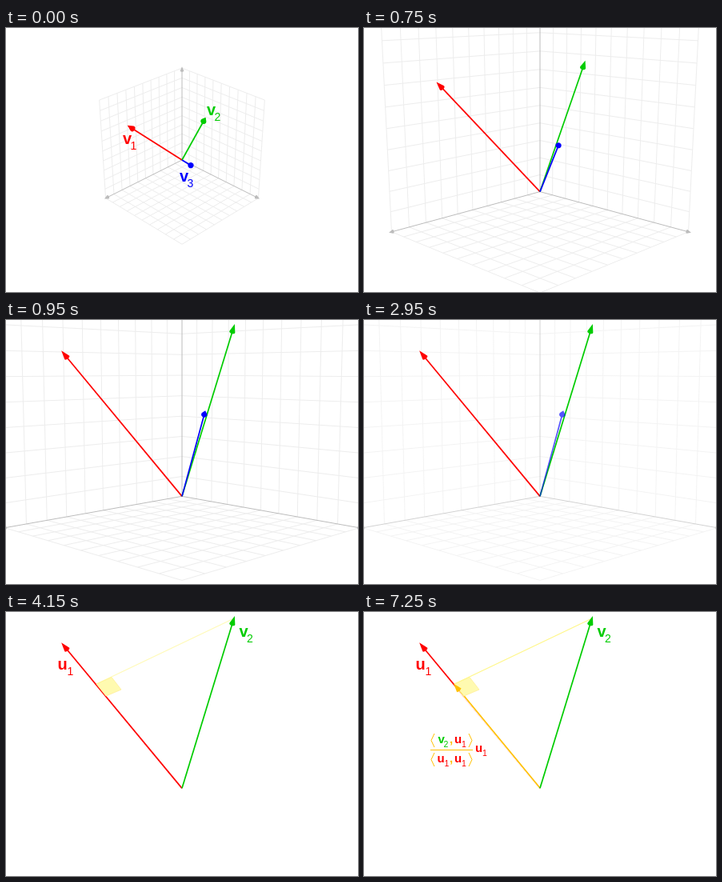
Write an HTML page that moves like this. It is 440 px wide and 330 px high and loops after 8 s.

```html
<!DOCTYPE html>
<html lang="en">
<head>
<meta charset="utf-8">
<title>Orthogonal projection of vectors</title>
<style>
  html, body { margin: 0; width: 100%; height: 100%; overflow: hidden; background: #fff; }
  svg { display: block; width: 100%; height: 100%; }
  text { font-family: "Liberation Sans", Arial, sans-serif; }
  .b { font-weight: bold; }
</style>
</head>
<body>
<svg id="stage" viewBox="0 0 440 330"></svg>
<script>
const RED = '#f00', GREEN = '#0c0', BLUE = '#00f', ORANGE = '#ffc000';
const LOOP = 8000, STEP = 50;
const FOCAL = 880, GRID = 0.985, CELLS = 10;

// World points are [right, toward viewer, up]; the floor axes lie at 45 degrees.
const world = (x, y, z) => [(y - x) * Math.SQRT1_2, (x + y) * Math.SQRT1_2, z];
const vectors = {
  red:   { tip: [-0.478, 0.594, 0.692], color: RED },
  green: { tip: [0.2046, 0.638, 0.7935], color: GREEN },
  blue:  { tip: [0.0825, 0.92, 0.473], color: BLUE }
};

const stage = document.getElementById('stage');
function add(parent, name, attrs = {}, text = '') {
  const node = document.createElementNS('http://www.w3.org/2000/svg', name);
  for (const key in attrs) node.setAttribute(key, attrs[key]);
  node.textContent = text;
  parent.appendChild(node);
  return node;
}
const group = () => add(stage, 'g');
const pathOf = pts => 'M' + pts.map(p => p[0].toFixed(2) + ' ' + p[1].toFixed(2)).join('L');

function addArrow(parent, color, width) {
  return {
    shaft: add(parent, 'path', { stroke: color, 'stroke-width': width, fill: 'none' }),
    head: add(parent, 'path', { fill: color })
  };
}
const addVector = (key, parent) => Object.assign(vectors[key], addArrow(parent, vectors[key].color, 1.7));

function addLabel(parent, x, y, letter, index, color, size = 20) {
  add(parent, 'text', { x, y, fill: color, 'font-size': size, class: 'b' }, letter);
  const advance = letter === 'u' ? 0.6 : 0.47;
  add(parent, 'text', {
    x: x + size * advance, y: y + size * 0.33, fill: color, 'font-size': size * 0.7
  }, index);
}

const scene = group();
const gridPath = add(scene, 'path', { stroke: '#ededed', fill: 'none' });
const axes = [world(1, 0, 0), world(0, 1, 0), world(0, 0, 1)]
  .map(tip => ({ tip, ...addArrow(scene, '#bcbcbc', 1) }));

addVector('red', stage);

// The white underlay lets the projected shaft replace the red one.
const projectedShaft = group();
for (const [stroke, width] of [['#fff', 3], [ORANGE, 1.7]]) {
  add(projectedShaft, 'path', { d: 'M220 220L118.5 97', stroke, 'stroke-width': width });
}

const right = group();
add(right, 'path', { d: 'M113 90L132 81.5L144 97L125 105Z', fill: '#fffab0', stroke: '#ffee99', 'stroke-width': 0.8 });
const dropLine = add(right, 'path', { d: 'M285 8L113 90', stroke: '#fff78a', 'stroke-width': 1.2 });

addVector('green', stage);
const blueGroup = group();
addVector('blue', blueGroup);

const firstLabels = group();
addLabel(firstLabels, 146, 145, 'v', '1', RED);
addLabel(firstLabels, 251, 109, 'v', '2', GREEN);
addLabel(firstLabels, 217, 192, 'v', '3', BLUE);

const secondLabels = group();
addLabel(secondLabels, 64.5, 72, 'u', '1', RED);
addLabel(secondLabels, 291.5, 31, 'v', '2', GREEN);

const projection = group();
add(projection, 'path', { d: 'M112 89.5L121.6 95.6L119.5 98.7L116.2 100.2Z', fill: ORANGE });
add(projection, 'path', { d: 'M83 172.5H136', stroke: ORANGE });
for (const y of [152, 176]) {
  add(projection, 'path', {
    d: `M88 ${y}L84 ${y + 8.5}L88 ${y + 17}M131 ${y}L135 ${y + 8.5}L131 ${y + 17}`,
    stroke: ORANGE, fill: 'none'
  });
  add(projection, 'text', { x: 107, y: y + 12, fill: ORANGE, 'font-size': 15, class: 'b' }, ',');
}
addLabel(projection, 92.5, 164, 'v', '2', GREEN, 15);
addLabel(projection, 113, 164, 'u', '1', RED, 15);
addLabel(projection, 91.5, 188, 'u', '1', RED, 15);
addLabel(projection, 113, 188, 'u', '1', RED, 15);
addLabel(projection, 139, 175, 'u', '1', RED, 15);

const mix = (a, b, p) => a + (b - a) * p;

// The camera glides on a straight line while its aim rises slightly.
function makeCamera(p) {
  const distance = mix(6.085, 3.41, p);
  const aim = mix(0, 0.219, p);
  const rise = mix(3.513, 0.615, p) - aim;
  const range = Math.hypot(distance, rise);
  const sin = rise / range, cos = distance / range;
  const depth = ([, d, z]) => range - d * cos - (z - aim) * sin;
  const project = v => {
    const k = FOCAL / depth(v);
    return [220 + v[0] * k, 165 - ((v[2] - aim) * cos - v[1] * sin) * k];
  };
  return { depth, project };
}

function convexHull(points) {
  const sorted = [...points].sort((a, b) => a[0] - b[0] || a[1] - b[1]);
  const half = list => {
    const out = [];
    for (const p of list) {
      while (out.length > 1) {
        const [a, b] = out.slice(-2);
        if ((b[0] - a[0]) * (p[1] - a[1]) - (b[1] - a[1]) * (p[0] - a[0]) > 0) break;
        out.pop();
      }
      out.push(p);
    }
    return out.slice(0, -1);
  };
  return [...half(sorted), ...half(sorted.reverse())];
}

const cross = (a, b) => [a[1] * b[2] - a[2] * b[1], a[2] * b[0] - a[0] * b[2], a[0] * b[1] - a[1] * b[0]];
const unit = v => v.map(c => c / Math.hypot(...v));

// Heads are cones whose size stays constant in pixels.
function drawArrow({ tip, shaft, head }, camera, length, radius) {
  const px = camera.depth(tip) / FOCAL;
  const dir = unit(tip);
  const a = unit(cross(dir, [1, 0, 0])), b = cross(dir, a);
  const base = tip.map((c, i) => c - dir[i] * length * px);
  const rim = Array.from({ length: 20 }, (_, n) => {
    const t = n * Math.PI / 10;
    return base.map((c, i) => c + radius * px * (a[i] * Math.cos(t) + b[i] * Math.sin(t)));
  });
  shaft.setAttribute('d', pathOf([[0, 0, 0], base].map(camera.project)));
  head.setAttribute('d', pathOf(convexHull([tip, ...rim].map(camera.project))) + 'Z');
}

function drawGrid({ project }) {
  const planes = [(a, b) => world(a, b, 0), (a, b) => world(a, 0, b), (a, b) => world(0, a, b)];
  let d = '';
  for (const plane of planes) {
    for (let i = 1; i <= CELLS; i++) {
      const c = GRID * i / CELLS;
      d += pathOf([plane(c, 0), plane(c, GRID)].map(project));
      d += pathOf([plane(0, c), plane(GRID, c)].map(project));
    }
  }
  gridPath.setAttribute('d', d);
}

const progress = (t, start, steps) =>
  Math.min(steps, Math.max(0, Math.floor((t - start) / STEP) + 1)) / steps;
const fade = (node, opacity) => node.setAttribute('opacity', opacity);

function render(t) {
  const u = progress(t, 500, 10);
  const camera = makeCamera(1 - (1 - u) ** 2);
  drawGrid(camera);
  for (const axis of axes) drawArrow(axis, camera, 6, 2.4);
  for (const key in vectors) drawArrow(vectors[key], camera, 12.5, 3.7);

  const flat = progress(t, 2950, 3);
  const dropped = progress(t, 4050, 3);
  const projected = progress(t, 7150, 3);
  fade(firstLabels, 1 - progress(t, 500, 3));
  fade(scene, 1 - flat);
  fade(blueGroup, 1 - flat);
  fade(right, dropped);
  fade(secondLabels, dropped);
  fade(dropLine, mix(0.6, 1, projected));
  fade(projectedShaft, projected);
  fade(projection, projected);
}

const start = performance.now();
function tick() {
  render((performance.now() - start) % LOOP);
  requestAnimationFrame(tick);
}
tick();
</script>
</body>
</html>
```
